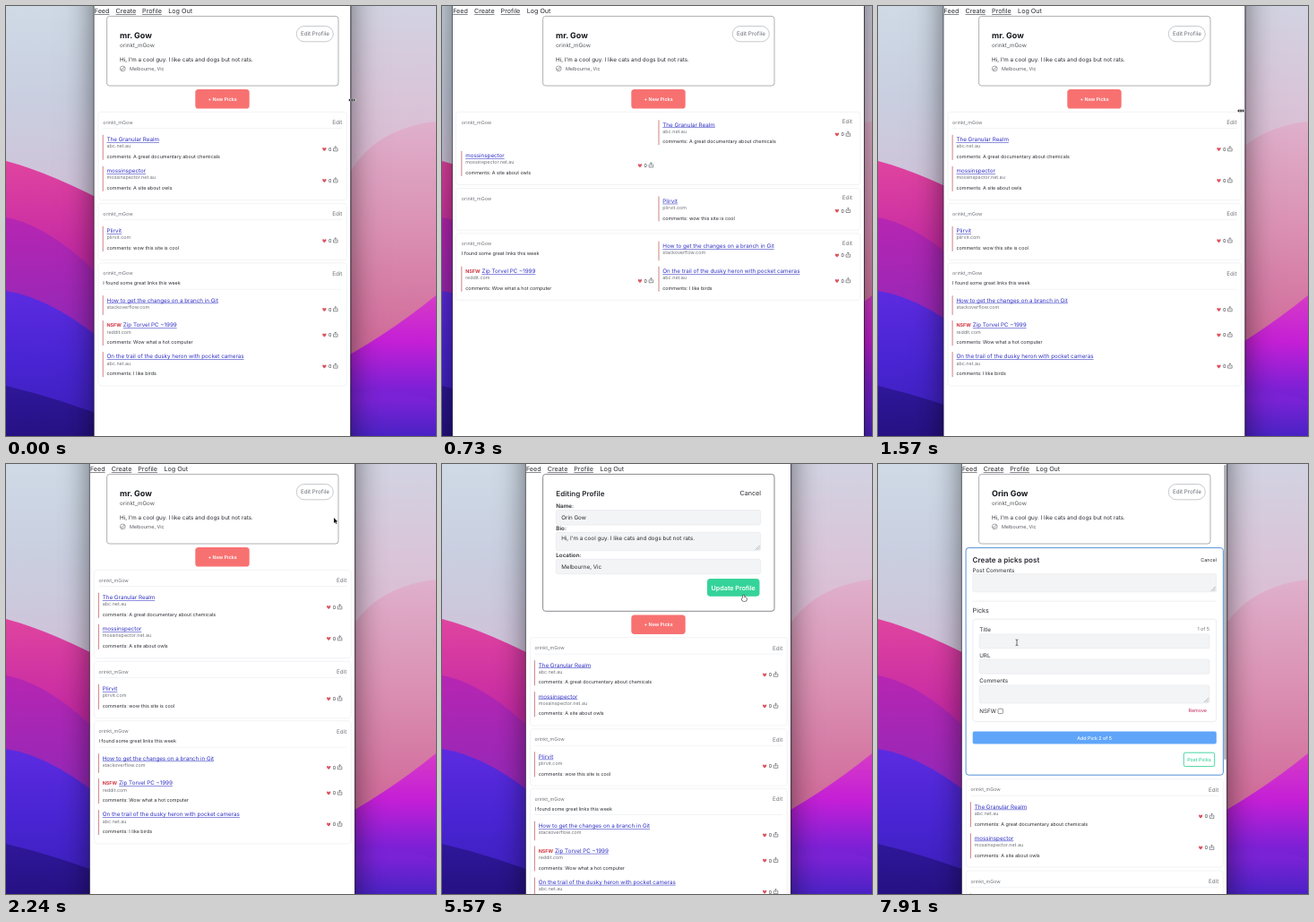
Write an HTML page with a canvas that moves like this. It is 480 px wide and 480 px high and loops after 8 s.

```html
<!DOCTYPE html>
<html lang="en">
<head>
<meta charset="utf-8">
<title>Picks profile</title>
<style>
html, body { margin: 0; width: 100%; height: 100%; overflow: hidden; background: #fff; }
canvas { display: block; width: 480px; height: 480px; }
</style>
</head>
<body>
<canvas id="stage"></canvas>
<script>
const canvas = document.getElementById('stage');
const ctx = canvas.getContext('2d');
const dpr = window.devicePixelRatio || 1;
canvas.width = canvas.height = 480 * dpr;

const LOOP = 8000, CX = 241.4;
const XS = 5.38, SM = 6.27, MD = 7.17, LG = 8.06, XL = 8.96;
const INK = '#2b2d33', GREY = '#6f7278', LINK = '#3131c4', RED = '#dd5560';
const GREEN = '#34d399', FIELD = '#f3f4f6', LINE = '#e4e6ea';
const USER = 'orinkt_mGow', BIO = "Hi, I'm a cool guy. I like cats and dogs but not rats.";
const PLACE = 'Melbourne, Vic';

// Moments of the story, in ms
const DROP = 1920, EDIT = 2640, FOCUS = 3150, BLUR = 5500, SAVE = 5735, CREATE = 7060;
const TYPING = [
  [0, 'mr.', ' Gow'], [3640, 'mr', ' Gow'], [3815, 'm', ' Gow'], [3895, '', ' Gow'],
  [4065, 'O', ' Gow'], [4145, 'Or', ' Gow'], [4315, 'Ori', ' Gow'], [4420, 'Orin', ' Gow']
];

const CARDS = [
  { top: 118.3, wideTop: 118.3, items: [
    { title: 'The Granular Realm', url: 'abc.net.au', note: 'A great documentary about chemicals' },
    { title: 'mossinspector', url: 'mossinspector.net.au', note: 'A site about owls' }] },
  { top: 220.4, wideTop: 203.5, items: [
    { title: 'Plirvit', url: 'plirvit.com', note: 'wow this site is cool' }] },
  { top: 286.8, wideTop: 253.8, intro: 'I found some great links this week', items: [
    { title: 'How to get the changes on a branch in Git', url: 'stackoverflow.com' },
    { title: 'Zip Torvel PC ~1999', url: 'reddit.com', note: 'Wow what a hot computer', nsfw: true },
    { title: 'On the trail of the dusky heron with pocket cameras', url: 'abc.net.au', note: 'I like birds' }] }
];

const clamp = v => Math.max(0, Math.min(1, v));
const ease = v => { v = clamp(v); return v * v * (3 - 2 * v); };
const mix = (a, b, p) => a + (b - a) * p;

function text(s, x, y, size, color = INK, weight = 400, align = 'left') {
  ctx.font = `${weight} ${size}px Inter, sans-serif`;
  ctx.textAlign = align;
  ctx.fillStyle = color;
  ctx.fillText(s, x, y);
  return ctx.measureText(s).width;
}

function underlined(s, x, y, size, color) {
  const w = text(s, x, y, size, color);
  ctx.fillRect(x, y + 1, w, 0.55);
}

function box(x0, y0, x1, y1, r, fill, stroke, lw = 0.8) {
  ctx.beginPath();
  ctx.roundRect(x0, y0, x1 - x0, y1 - y0, r);
  if (fill) { ctx.fillStyle = fill; ctx.fill(); }
  if (stroke) { ctx.strokeStyle = stroke; ctx.lineWidth = lw; ctx.stroke(); }
}

function lines(color, lw, ...paths) {
  ctx.strokeStyle = color;
  ctx.lineWidth = lw;
  ctx.beginPath();
  for (const p of paths)
    for (let i = 0; i < p.length; i += 2) ctx[i ? 'lineTo' : 'moveTo'](p[i], p[i + 1]);
  ctx.stroke();
}

function fade(y0, y1, colors) {
  const g = ctx.createLinearGradient(0, y0, 0, y1);
  colors.forEach((c, i) => g.addColorStop(i / (colors.length - 1), c));
  return g;
}

function wave(x0, y0, cx, cy, x1, y1, ...colors) {
  ctx.beginPath();
  ctx.moveTo(x0, y0);
  ctx.quadraticCurveTo(cx, cy, x1, y1);
  ctx.lineTo(x1, 480);
  ctx.lineTo(x0, 480);
  ctx.fillStyle = fade(Math.min(y0, y1), 480, colors);
  ctx.fill();
}

function wallpaper() {
  ctx.fillStyle = fade(0, 200, ['#cfdae6', '#c9cfe0', '#cfc3da']);
  ctx.fillRect(0, 0, 241, 480);
  ctx.fillStyle = fade(0, 200, ['#d2d3e2', '#d9c5d9', '#dcb6cf']);
  ctx.fillRect(241, 0, 239, 480);
  wave(0, 173, 50, 186, 125, 226, '#e0449f', '#c62aa4', '#a322b6', '#5a22c0');
  wave(0, 236, 55, 246, 125, 322, '#b626b2', '#9527b8', '#6423c8');
  wave(0, 318, 55, 326, 125, 388, '#5c2be0', '#4824d2', '#3a1fb8');
  wave(0, 424, 60, 438, 125, 464, '#2f1799', '#261184');
  wave(376, 202, 402, 138, 480, 129, '#dfb0cb', '#db91b4', '#d26f9c', '#c45f98');
  wave(360, 402, 422, 370, 480, 323, '#d63bc6', '#c41fd6', '#7d20d6', '#5522c6');
  wave(360, 440, 425, 418, 480, 442, '#7a22d6', '#4a22c4');
}

function heart(x, y) {
  ctx.fillStyle = RED;
  ctx.beginPath();
  ctx.moveTo(x, y + 2.2);
  ctx.bezierCurveTo(x - 3.8, y - 0.5, x - 1.8, y - 3.1, x, y - 1.1);
  ctx.bezierCurveTo(x + 1.8, y - 3.1, x + 3.8, y - 0.5, x, y + 2.2);
  ctx.fill();
}

function counter(x, y) {
  heart(x, y);
  text('0', x + 6.2, y + 2, XS, INK, 400, 'center');
  const s = x + 12.4;
  lines('#4c4f55', 0.6,
    [s - 1, y - 1, s - 2.3, y - 1, s - 2.3, y + 2, s + 2.3, y + 2, s + 2.3, y - 1, s + 1, y - 1],
    [s, y + 0.5, s, y - 3.2], [s - 1.2, y - 2.1, s, y - 3.3, s + 1.2, y - 2.1]);
}

function pick(it, x, y, likeX) {
  const h = it.note ? 28 : 21.5;
  ctx.fillStyle = '#cf8288';
  ctx.fillRect(x - 0.5, y - 7.3, 1, h);
  let tx = x + 4.3;
  if (it.nsfw) tx += text('NSFW', tx, y, XS, '#d2343f', 700) + 2;
  underlined(it.title, tx, y, SM, LINK);
  text(it.url, x + 4.3, y + 7.2, XS, GREY);
  if (it.note) text('comments: ' + it.note, x + 4.3, y + 18.9, XS);
  counter(likeX, y + (it.note ? 8.8 : 8.2));
}

function narrowCard(card, L, R, dy) {
  const top = card.top + dy, x = L + 9.8;
  const extra = card.intro ? 11 : 0;
  const heights = card.items.map(it => it.note ? 35 : 27.8);
  const end = top + 28.3 + extra + heights.reduce((a, b) => a + b, 0);
  box(L + 4.7, top, R - 4, end, 3, null, '#eceef1', 0.7);
  text(USER, x, top + 13.6, XS, GREY);
  text('Edit', R - 9, top + 14, SM, GREY, 400, 'right');
  if (card.intro) text(card.intro, x, top + 24.6, XS);
  ctx.fillStyle = '#eceef1';
  ctx.fillRect(x, top + 18 + extra, R - 9 - x, 0.7);
  let y = top + 32.8 + extra;
  card.items.forEach((it, i) => { pick(it, x, y, R - 29); y += heights[i]; });
}

function wideCard(card, L, R) {
  const top = card.wideTop, left = L + 10, mid = CX + 0.6;
  const first = card.items[0].note ? 34.7 : 28;
  const rows = Math.ceil((card.items.length + 1) / 2);
  box(L + 3.7, top, R - 4, top + 12 + first + (rows - 1) * 34.5, 3, null, '#eceef1', 0.7);
  text(USER, left, top + 13.4, XS, GREY);
  text('Edit', R - 13, top + 12.7, SM, GREY, 400, 'right');
  if (card.intro) text(card.intro, left, top + 24.3, XS);
  card.items.forEach((it, i) => {
    const cell = i + 1, right = cell % 2;
    const y = top + 16.2 + (cell > 1 ? first : 0);
    pick(it, right ? mid : left, y, right ? R - 30 : mid - 21);
  });
}

function nav(L) {
  underlined('Feed', L + 0.3, 8.3, MD);
  underlined('Create', L + 24.2, 8.3, MD);
  underlined('Profile', L + 53.7, 8.3, MD);
  text('Log Out', L + 82.8, 8.3, MD);
}

function profile(name) {
  box(112.6, 11.4, 371, 89, 3, '#fff', '#9a9ca0');
  text(name, 127, 35.7, XL, '#15171c', 700);
  text(USER, 127, 45.8, SM, '#55585e');
  text(BIO, 127, 62, SM);
  text(PLACE, 138, 71.9, XS, '#55585e');
  ctx.beginPath();
  ctx.arc(130.3, 69.9, 2.9, 0, 7);
  ctx.strokeStyle = '#6c6f75';
  ctx.lineWidth = 0.6;
  ctx.stroke();
  lines('#6c6f75', 0.5, [127.8, 70.6, 130, 70.2, 131, 68.6, 132.6, 68.2], [128.6, 72, 130.4, 71.4, 132.4, 69.6]);
  box(324.3, 22.5, 365.3, 39.8, 8.6, '#fff', '#b9bbc0');
  text('Edit Profile', 344.9, 33.4, SM, '#686b72', 400, 'center');
}

function field(x0, y0, x1, y1, focus) {
  box(x0, y0, x1, y1, 2, FIELD, focus ? '#a3a9b3' : LINE, focus ? 0.9 : 0.6);
}

function grip(x, y) {
  lines('#85888e', 0.6, [x - 5, y, x, y - 5], [x - 2.5, y, x, y - 2.5]);
}

function editor(t) {
  const focus = t >= FOCUS && t < BLUR;
  box(112.6, 11.4, 371, 164.3, 3, '#fff', '#6a6d73');
  text('Editing Profile', 127.3, 35.6, LG, INK, 600);
  text('Cancel', 356, 35, MD, INK, 400, 'right');
  text('Name:', 127.3, 49.4, SM, INK, 600);
  field(127.3, 51.5, 355.7, 68, focus);
  const [, head, tail] = TYPING.filter(k => t >= k[0]).pop();
  text(head + tail, 133.2, 62, SM);
  if (focus) {
    ctx.fillStyle = '#222';
    ctx.fillRect(133.2 + ctx.measureText(head).width, 56.4, 0.6, 7);
  }
  text('Bio:', 127.3, 74.3, SM, INK, 600);
  field(127.3, 76.3, 355.7, 96.8);
  text(BIO, 133.2, 85.3, SM);
  grip(354.8, 95.9);
  text('Location:', 127.3, 104.2, SM, INK, 600);
  field(127.3, 106.3, 355.7, 122.7);
  text(PLACE, 133.2, 116.8, SM);
  const over = t > 5330;
  box(296.5, 128.6, 354, 147.2, 2.5, over ? GREEN : '#fff', GREEN, 1);
  text('Update Profile', 325.2, 140.5, MD, over ? '#fff' : GREEN, 600, 'center');
}

function creator() {
  box(98.1, 93.6, 385.4, 347.2, 3, '#fff', '#5590d8', 1);
  text('Create a picks post', 105.6, 110.2, LG, INK, 600);
  text('Cancel', 378, 109.2, XS, INK, 400, 'right');
  text('Post Comments', 105.6, 120.5, SM);
  field(105.8, 122.7, 377.7, 142.8);
  grip(376.8, 141.9);
  ctx.fillStyle = LINE;
  ctx.fillRect(105.6, 152.7, 272, 0.7);
  text('Picks', 105.6, 166.4, MD);
  box(105.9, 173.2, 377.7, 287.6, 3, null, LINE, 0.8);
  text('Title', 113.2, 187.2, SM);
  text('1 of 5', 370, 185.8, XS, GREY, 400, 'right');
  field(113.2, 189.9, 370, 205.9);
  text('URL', 113.2, 215.9, SM);
  field(113.2, 218.2, 370, 234.2);
  text('Comments', 113.2, 244.3, SM);
  field(113.2, 246.9, 370, 267);
  grip(369.1, 266.1);
  text('NSFW', 113.2, 278, SM);
  box(134, 273.2, 139.4, 278.6, 0.8, '#fff', '#66696f', 0.7);
  text('Remove', 367, 276.8, XS, '#c81e5b', 400, 'right');
  box(105.7, 298.4, 377.8, 312.6, 2, '#60a5fa');
  text('Add Pick 2 of 5', 241.6, 307.5, XS, '#fff', 500, 'center');
  box(341.3, 322.2, 375.7, 337.6, 2, '#fff', GREEN, 0.9);
  text('Post Picks', 358.5, 331.9, XS, GREEN, 500, 'center');
}

function newPicks(dy) {
  box(211.3, 93 + dy, 271.7, 114.5 + dy, 3.6, '#f87171');
  text('+ New Picks', 241.6, 105.8 + dy, XS, '#fff', 600, 'center');
}

const CURSORS = {
  arrow(x, y) {
    ctx.beginPath();
    [[0, 0], [0, 6], [1.4, 4.8], [2.4, 6.9], [3.3, 6.5], [2.4, 4.4], [4.2, 4.3]]
      .forEach(p => ctx.lineTo(x + p[0], y + p[1]));
    ctx.closePath();
    ctx.fillStyle = '#111';
    ctx.strokeStyle = '#fff';
    ctx.lineWidth = 0.8;
    ctx.stroke();
    ctx.fill();
  },
  beam(x, y) {
    lines('#333', 0.7, [x - 1.4, y - 3.4, x, y - 2.8, x + 1.4, y - 3.4],
      [x, y - 2.8, x, y + 2.8], [x - 1.4, y + 3.4, x, y + 2.8, x + 1.4, y + 3.4]);
  },
  hand(x, y) {
    ctx.beginPath();
    ctx.roundRect(x - 0.9, y, 1.5, 4.5, 0.7);
    ctx.roundRect(x - 2, y + 2.7, 5, 4, 1.4);
    ctx.strokeStyle = '#222';
    ctx.lineWidth = 1.2;
    ctx.stroke();
    ctx.fillStyle = '#fff';
    ctx.fill();
  },
  resize(x, y) {
    const arms = [[x - 3.4, y, x + 3.4, y], [x - 1.8, y - 1.5, x - 3.4, y, x - 1.8, y + 1.5],
      [x + 1.8, y - 1.5, x + 3.4, y, x + 1.8, y + 1.5], [x, y - 1.6, x, y + 1.6]];
    lines('#fff', 1.8, ...arms);
    lines('#111', 0.9, ...arms);
  }
};

// Each stretch: start, end, from x y, to x y
const MOVES = [
  [DROP, 2240, 390, 117, 366, 60], [2240, 2570, 366, 60, 347, 31],
  [2680, 3020, 347, 31, 142, 60], [4990, 5560, 142, 60, 337, 146.3],
  [5740, 6960, 337, 146.3, 241, 103], [7290, 7910, 241, 103, 155, 199.3]
];

function pointer(t, half) {
  if (t < DROP) {
    // the hand runs a little ahead of the window edge
    if (half < 222) CURSORS.resize(CX + halfWidth(t + 65) + 1.8, mix(105, 117, ease(t / 1500)));
    return;
  }
  if (t > 3640 && t < 4990) return;
  const [a, b, x0, y0, x1, y1] = MOVES.filter(m => t >= m[0]).pop();
  const p = ease((t - a) / (b - a));
  const x = mix(x0, x1, p), y = mix(y0, y1, p);
  const inside = (l, u, r, d) => x > l && x < r && y > u && y < d;
  const form = t >= EDIT && t < SAVE, shift = form ? 75.4 : 0;
  let kind = 'arrow';
  if (form) {
    if (inside(127, 51, 356, 68) || inside(127, 76, 356, 97) || inside(127, 106, 356, 123)) kind = 'beam';
    if (inside(296, 128, 354, 147.5)) kind = 'hand';
  } else if (inside(324, 22, 366, 40)) kind = 'hand';
  if (t >= CREATE) {
    if (inside(105, 122, 378, 143) || inside(113, 190, 370, 206)) kind = 'beam';
  } else if (inside(211, 93 + shift, 272, 115 + shift)) kind = 'hand';
  CURSORS[kind](x, y);
}

// One drag outwards and back, without a rest at the widest point
function halfWidth(t) {
  return t < 820 ? mix(143, 233, ease((t - 65) / 755)) : mix(233, 147.8, ease((t - 820) / 1100));
}

function draw(t) {
  ctx.setTransform(dpr, 0, 0, dpr, 0, 0);
  ctx.textRendering = 'geometricPrecision';
  wallpaper();
  const half = halfWidth(t), L = CX - half, R = CX + half;

  ctx.save();
  ctx.shadowColor = 'rgba(0,0,0,.55)';
  ctx.shadowBlur = 32 * dpr;
  ctx.fillStyle = '#fff';
  ctx.fillRect(L, -60, R - L, 600);
  ctx.restore();
  ctx.fillStyle = 'rgba(25,25,35,.75)';
  ctx.fillRect(L - 0.7, 0, 0.7, 480);
  ctx.fillRect(R, 0, 1, 480);

  nav(L);
  const editing = t >= EDIT && t < SAVE, creating = t >= CREATE;
  const dy = editing ? 75.4 : creating ? 233.5 : 0;
  if (editing) editor(t);
  else profile(t < SAVE ? 'mr. Gow' : 'Orin Gow');
  if (creating) {
    creator();
    box(R - 2.8, 1, R - 0.6, 330, 1, '#9b9da1');
  } else newPicks(dy);
  for (const card of CARDS) {
    if (half > 172) wideCard(card, L, R);
    else narrowCard(card, L, R, dy);
  }
  pointer(t, half);
}

const start = performance.now();
function tick() {
  draw((performance.now() - start) % LOOP);
  requestAnimationFrame(tick);
}
tick();
</script>
</body>
</html>
```
